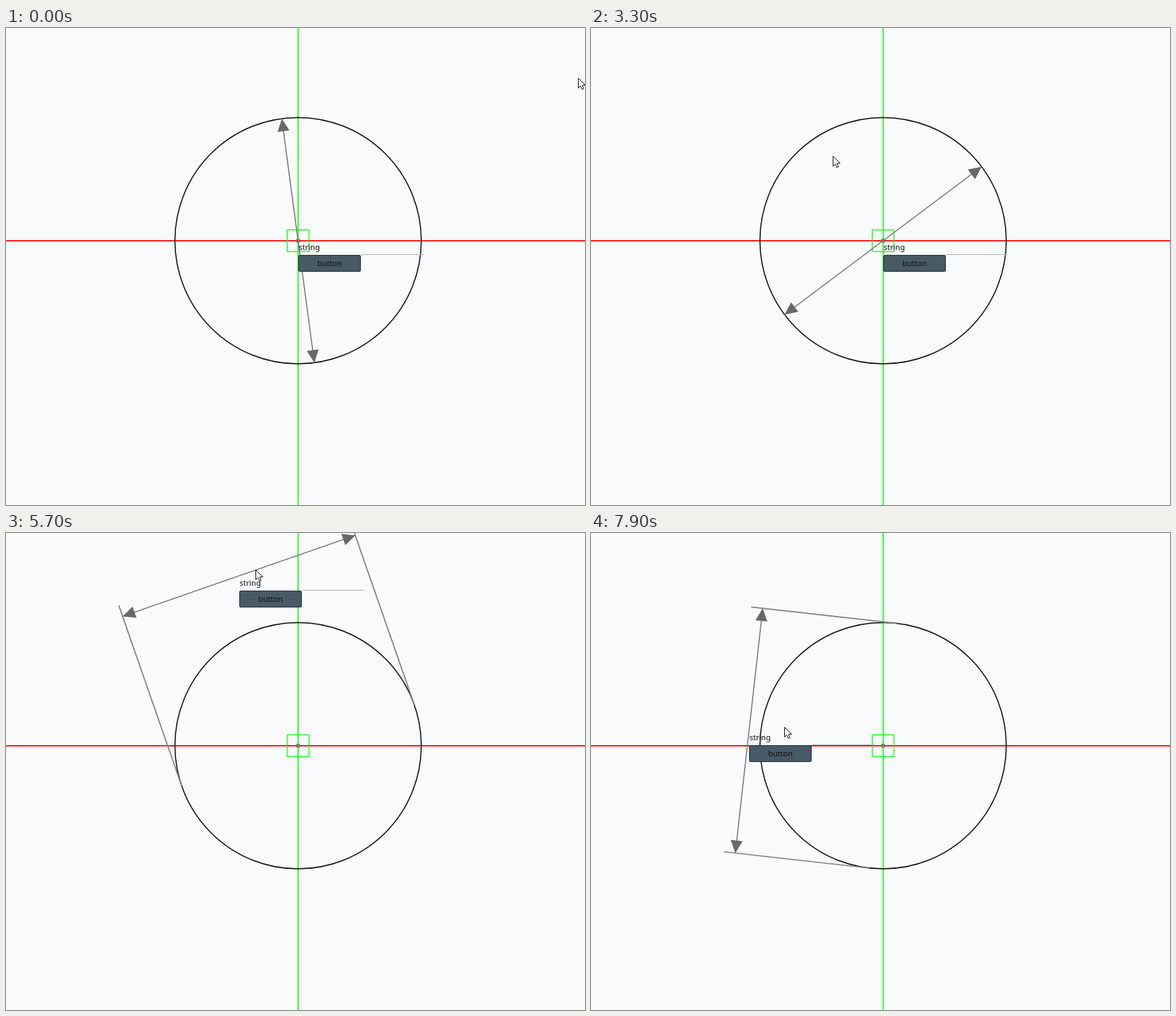
Animation, 824 px wide and 679 px high, one loop 8000 ms. Source, as an HTML page with a canvas:

```html
<!DOCTYPE html>
<html>
<head>
<meta charset="utf-8">
<style>
html, body { margin: 0; width: 100%; height: 100%; overflow: hidden; background: #f8fafc; }
canvas { display: block; }
</style>
</head>
<body>
<canvas id="stage" width="824" height="679"></canvas>
<script>
const ctx = document.getElementById('stage').getContext('2d');
const LOOP = 8000, STEP = 100, CX = 415.7, CY = 302.8, R = 175.3;

// Pointer before the drag: time, x, y
const approach = [[0, 814, 71], [800, 384, 240], [1000, 405, 227]];
// Turning points of the drag: time, angle in degrees, distance from the centre
const drag = [
  [1600, 263, 76], [2400, 405, 98], [2500, 407.4, 101], [3200, 593.1, 140],
  [4100, 775, 165], [4200, 793, 255], [4600, 799.5, 323], [4700, 801.7, 321],
  [5100, 869, 312], [5600, 970.8, 256], [6400, 1102, 300], [6700, 1037, 300],
  [6900, 1067.1, 292.5], [7000, 1091.9, 303], [7600, 1228, 270],
  [7800, 1266.4, 192], [7900, 1270.7, 143]
];

// Eases from one key to the next
function sample(keys, t) {
  const i = keys.findIndex(k => k[0] > t);
  if (i < 0) return keys[keys.length - 1].slice(1);
  const [t0, x0, y0] = keys[i - 1], [t1, x1, y1] = keys[i];
  const u = (t - t0) / (t1 - t0), s = u * u * (3 - 2 * u);
  return [x0 + (x1 - x0) * s, y0 + (y1 - y0) * s];
}

function polar(deg, r) {
  const a = deg * Math.PI / 180;
  return [CX + r * Math.cos(a), CY + r * Math.sin(a)];
}

function line(x1, y1, x2, y2, color, width) {
  ctx.strokeStyle = color;
  ctx.lineWidth = width;
  ctx.beginPath();
  ctx.moveTo(x1, y1);
  ctx.lineTo(x2, y2);
  ctx.stroke();
}

function polygon(points) {
  ctx.beginPath();
  points.forEach(p => ctx.lineTo(p[0], p[1]));
  ctx.closePath();
}

function square(half, color) {
  ctx.strokeStyle = color;
  ctx.lineWidth = 1.2;
  ctx.strokeRect(CX - half, CY - half, 2 * half, 2 * half);
}

function drawSketch() {
  ctx.fillStyle = '#f8fafc';
  ctx.fillRect(0, 0, 824, 679);
  ctx.strokeStyle = '#0c0c0c';
  ctx.lineWidth = 1.5;
  ctx.beginPath();
  ctx.arc(CX, CY, R, 0, 7);
  ctx.stroke();
  line(0, CY, 824, CY, '#f00', 1.8);
  line(CX, 0, CX, 679, '#0f0', 1.5);
  square(15.4, '#0f0');
  square(2, '#6b6b4a');
  ctx.fillStyle = '#222';
  for (let deg = 0; deg < 360; deg += 90) {
    const [x, y] = polar(deg, R);
    ctx.fillRect(x - 1, y - 1, 2, 2);
  }
}

// Linear dimension in a frame whose x axis is the offset direction
function drawDimension(deg, d) {
  ctx.save();
  ctx.translate(CX, CY);
  ctx.rotate(deg * Math.PI / 180);
  line(d, -R, d, R, '#707070', 1.4);
  ctx.fillStyle = '#686868';
  for (const s of [-1, 1]) {
    if (d) line(0, s * R, d + 16.5, s * R, '#828282', 1.7);
    polygon([[d, s * R], [d - 8.5, s * (R - 18)], [d + 8.5, s * (R - 18)]]);
    ctx.fill();
  }
  ctx.restore();
}

function drawLabel([mx, my]) {
  const x = Math.round(mx), y = Math.round(my + 20.6);
  line(x + 89, y - 0.5, x + 178, y - 0.5, '#b4b6b8', 1);
  ctx.fillStyle = '#475a66';
  ctx.strokeStyle = '#22303b';
  ctx.beginPath();
  ctx.roundRect(x + 0.5, y + 0.5, 88, 23, 1.5);
  ctx.fill();
  ctx.stroke();
  ctx.font = '11px "Noto Sans", sans-serif';
  ctx.fillStyle = '#111';
  ctx.textAlign = 'left';
  ctx.fillText('string', x + 0.5, y - 7);
  ctx.textAlign = 'center';
  ctx.fillText('button', x + 44.5, y + 16);
}

function drawPointer([px, py]) {
  ctx.save();
  ctx.translate(Math.round(px) + 0.5, Math.round(py) + 0.5);
  polygon([[0, 0], [0, 14], [3.2, 11], [5.4, 16], [7.6, 15], [5.6, 10.2], [10, 10]]);
  ctx.fillStyle = '#fff';
  ctx.fill();
  ctx.strokeStyle = '#111';
  ctx.lineWidth = 1;
  ctx.stroke();
  ctx.restore();
}

function draw(t) {
  const dragging = t > 1600;
  // The dimension trails the pointer by one step and snaps inside the circle
  let [deg, d] = dragging ? sample(drag, t - STEP) : [352.4, 0];
  if (d < R) d = 0;
  drawSketch();
  drawDimension(deg, d);
  drawLabel(polar(deg, d));
  drawPointer(dragging ? polar(...sample(drag, t)) : sample(approach, t));
}

let start;
function tick(now) {
  start ??= now;
  draw(Math.floor((now - start) % LOOP / STEP) * STEP);
  requestAnimationFrame(tick);
}
draw(0);
requestAnimationFrame(tick);
</script>
</body>
</html>
```
